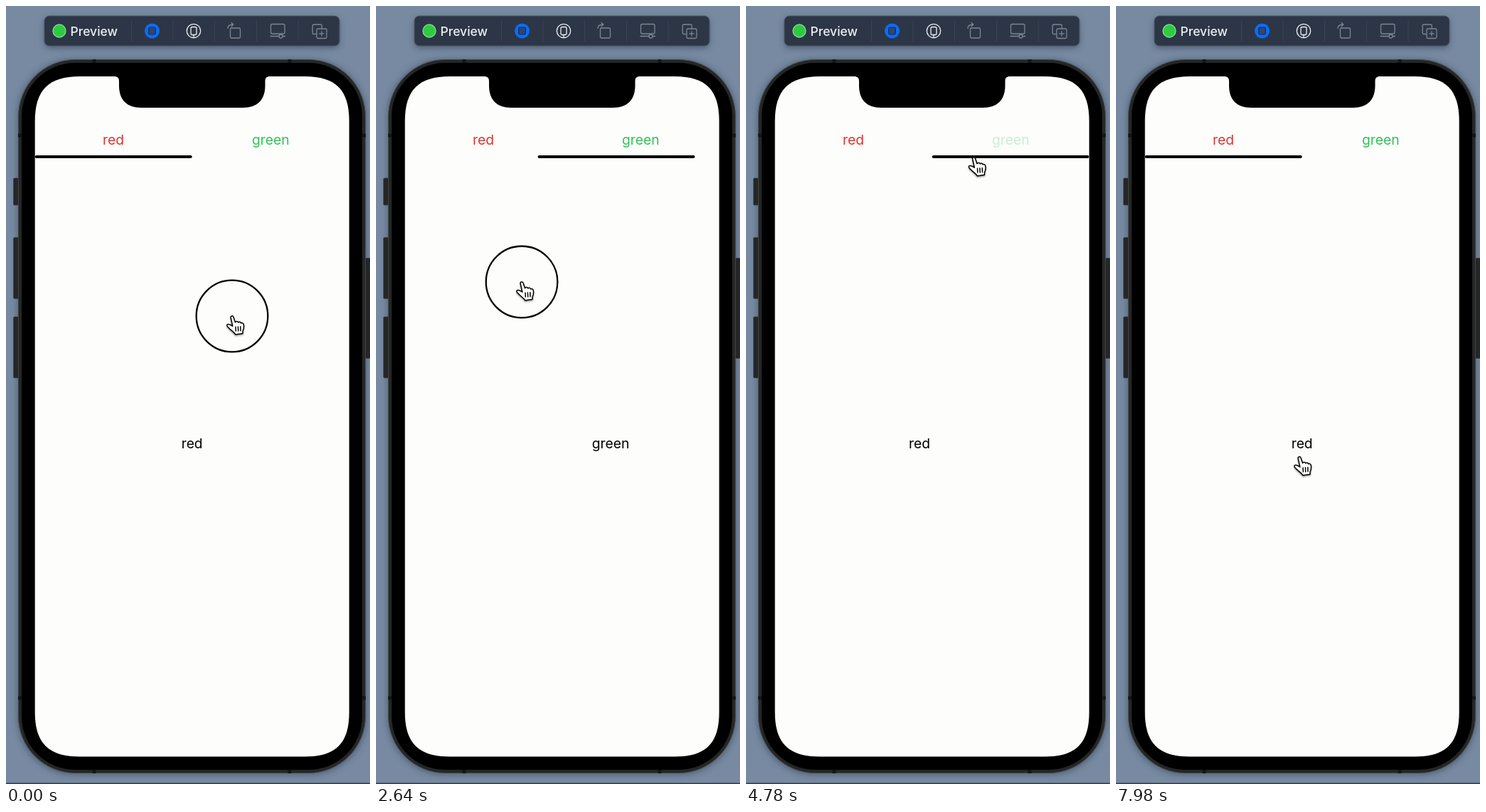
An HTML page for the animation above (8 s loop, 512 by 1094 pixels).

```html
<!DOCTYPE html>
<html lang="en">
<head>
<meta charset="utf-8">
<title>Swipe tabs preview</title>
<style>
  html, body { margin: 0; width: 100%; height: 100%; overflow: hidden; background: #778aa2; }
  svg { display: block; width: 512px; height: 1094px; }
  text { font-family: Inter, "Open Sans", sans-serif; font-size: 19.3px; }
  .mid { text-anchor: middle; }
  .line { fill: none; stroke-width: 1.3; stroke-linecap: round; stroke-linejoin: round; }
  .dim { stroke: #7e8691; }
</style>
</head>
<body>
<svg viewBox="0 0 512 1094">
  <defs>
    <clipPath id="screen"><path d="M40.7 162C40.7 118 60 99 104 99H420C464 99 482.7 118 482.7 162V993C482.7 1037 464 1055.5 420 1055.5H104C60 1055.5 40.7 1037 40.7 993Z"/></clipPath>
    <filter id="soft" x="-20%" y="-20%" width="140%" height="150%"><feGaussianBlur stdDeviation="4"/></filter>
    <filter id="drop" x="-50%" y="-50%" width="200%" height="200%"><feDropShadow dx="0" dy="1.5" stdDeviation="1" flood-opacity=".4"/></filter>
  </defs>

  <rect width="512" height="1094" fill="#778aa2"/>
  <rect y="1092.5" width="512" height="1.5" fill="#343c49"/>

  <!-- toolbar -->
  <rect x="54" y="17" width="415" height="42" rx="7" fill="#26303f" opacity=".5" filter="url(#soft)"/>
  <rect x="54" y="14" width="415" height="42" rx="7" fill="#2d3646" stroke="#4a5360"/>
  <path d="M176.5 20V50M235 20V50M293.5 20V50M352.5 20V50M411 20V50" stroke="#3a4351"/>
  <circle cx="75" cy="35" r="9" fill="#2dcb42" stroke="#7fdc8c" stroke-width="1.4"/>
  <text x="90.5" y="41.5" fill="#eef0f4" style="font-size:17.5px;font-weight:500">Preview</text>
  <circle cx="205.5" cy="35" r="10.5" fill="#0a6cf8"/>
  <rect x="200.7" y="30.2" width="9.6" height="9.6" rx="1.5" fill="#2c4778" stroke="#1c2f52" stroke-width="1.3"/>
  <g class="line" stroke="#eef0f4">
    <circle cx="264" cy="35" r="9.7"/>
    <rect x="260" y="29.5" width="8" height="11" rx="2"/>
    <path d="M264 41V44.5"/>
  </g>
  <g class="line dim">
    <rect x="315.5" y="31" width="14" height="14" rx="1.8"/>
    <path d="M312 31.5C312 27.5 314.5 26 319.5 26M317 23.5L319.8 26L317 28.7"/>
    <rect x="372.5" y="25.5" width="19.5" height="13.5" rx="2"/>
    <path d="M372 42.5H383.5M389.5 42.5H392.5"/>
    <circle cx="386.5" cy="42.5" r="2.5"/>
    <path d="M436 39.5H433Q431.2 39.5 431.2 37.7V27.8Q431.2 26 433 26H442.5Q444.3 26 444.3 27.8V31"/>
    <rect x="437" y="32" width="14" height="13.5" rx="1.8"/>
    <path d="M444 35.7V42M440.8 38.8H447.2"/>
  </g>

  <!-- device -->
  <rect x="16" y="75" width="491" height="1006" rx="80" fill="#2c3746" opacity=".5" filter="url(#soft)"/>
  <g fill="#252627" stroke="#3b3d3f" stroke-width=".7">
    <rect x="10.5" y="242" width="8" height="38" rx="1.5"/>
    <rect x="10.5" y="325.5" width="8" height="86" rx="1.5"/>
    <rect x="10.5" y="437" width="8" height="86" rx="1.5"/>
    <rect x="505.5" y="354.5" width="8" height="141" rx="1.5"/>
  </g>
  <rect x="17.5" y="75.5" width="488" height="1003" rx="80" fill="#252626" stroke="#424445"/>
  <path d="M17 182H22M501 182H506M17 973H22M501 973H506M124 75V80M399 1074V1079M399 75V80M124 1074V1079" stroke="#151616" stroke-width="5"/>
  <rect x="22" y="80" width="479" height="994" rx="75"/>

  <!-- app -->
  <g clip-path="url(#screen)">
    <rect x="40" y="99" width="444" height="957" fill="#fdfdfc"/>
    <text id="tabRed" class="mid" x="151" y="194.5" fill="#dd352e">red</text>
    <text id="tabGreen" class="mid" x="372.3" y="194.5" fill="#34c058">green</text>
    <rect id="bar" x="40.7" y="210" width="221" height="4" rx="2"/>
    <g id="pages">
      <text class="mid" x="261.7" y="621.5">red</text>
      <text class="mid" x="703.7" y="621.5">green</text>
    </g>
    <path d="M152 98V99C157 99 159 101 159 106V112C159 132 170 143 190 143H333.5C353.5 143 364.5 132 364.5 112V106C364.5 101 366.5 99 371.5 99V98Z"/>
  </g>

  <!-- pointer -->
  <g id="pointer">
    <circle id="ring" r="50.3" fill="none" stroke="#000" stroke-width="2.3"/>
    <g filter="url(#drop)" stroke="#000" stroke-width="1.5" stroke-linejoin="round" stroke-linecap="round">
      <path fill="#fff" d="M-1.8 2.5C-2.5 -.3 1 -1.2 2 1.5L4.5 8.7C5.5 7 8 7 8.8 9C10 7.8 12 8 12.7 10C14 9 16 10 16.2 12C17 15 16.5 18 15 21L15 24.5L4.8 26C3 22.5 -2 20 -4.8 16.5C-7.5 14.3 -8 12 -5.5 11.5C-3.5 11.3 -1.5 12.5 .8 14.2Z"/>
      <path fill="none" d="M5 15.2L5.3 21M8.4 15L8.7 21M11.8 14.7L12 20.7"/>
    </g>
  </g>
</svg>
<script>
const LOOP = 8000;
const $ = id => document.getElementById(id);
const eases = {
  smooth: q => q * q * (3 - 2 * q),
  in: q => q ** 1.7,
  out: q => 1 - (1 - q) ** 3
};

// Keys are [step, value, easing into it].
function track(keys, n) {
  let prev = keys[0];
  for (const key of keys) {
    if (n < key[0]) {
      const q = (n - prev[0]) / (key[0] - prev[0]);
      return prev[1] + (key[1] - prev[1]) * eases[key[2] || "smooth"](q);
    }
    prev = key;
  }
  return prev[1];
}

const posX = [[0, 318], [4, 318], [12, 124.5, "in"], [18, 124.5], [36, 138], [48, 138],
  [62, 311.5, "in"], [73, 311.5], [95, 320.5], [107, 320.5], [130, 173.5], [145, 173.5], [165, 258]];
const posY = [[0, 436], [18, 436], [36, 401], [48, 401], [62, 367.5, "in"], [73, 367.5],
  [95, 213], [107, 213], [130, 200], [145, 200], [165, 634]];
const page = [[0, 0], [4, 0], [12, .42, "in"], [27, 1, "out"], [48, 1], [62, .6, "in"],
  [78, 0, "out"], [102, 0], [110.3, 1], [142, 1], [150.3, 0]];
const bar = [[0, 0], [4, 0], [13, .45, "in"], [28, 1, "out"], [48, 1], [62, .6, "in"],
  [78, 0, "out"], [101, 0], [102, 1], [141, 1], [142, 0]];
const presses = [[0, 12], [42, 62], [99, 101], [138, 141]];
const fade = at => [[at, 1], [at + 1, .25], [at + 5, .25], [at + 10, 1]];
const redFade = fade(138), greenFade = fade(99);

// Three steps every 140 ms, the middle one held for 100 ms.
function stepAt(t) {
  const m = t % 140;
  return 3 * Math.floor(t / 140) + (m < 20 ? 0 : m < 120 ? 1 : 2);
}

const shift = (id, x, y = 0) => $(id).setAttribute("transform", `translate(${x} ${y})`);

function draw() {
  const n = stepAt(performance.now() % LOOP);
  shift("pointer", track(posX, n), track(posY, n));
  shift("pages", -442 * track(page, n));
  shift("bar", 221 * track(bar, n));
  $("ring").style.opacity = presses.some(([a, b]) => n >= a && n <= b) ? 1 : 0;
  $("tabRed").style.opacity = track(redFade, n);
  $("tabGreen").style.opacity = track(greenFade, n);
  requestAnimationFrame(draw);
}
draw();
</script>
</body>
</html>
```
